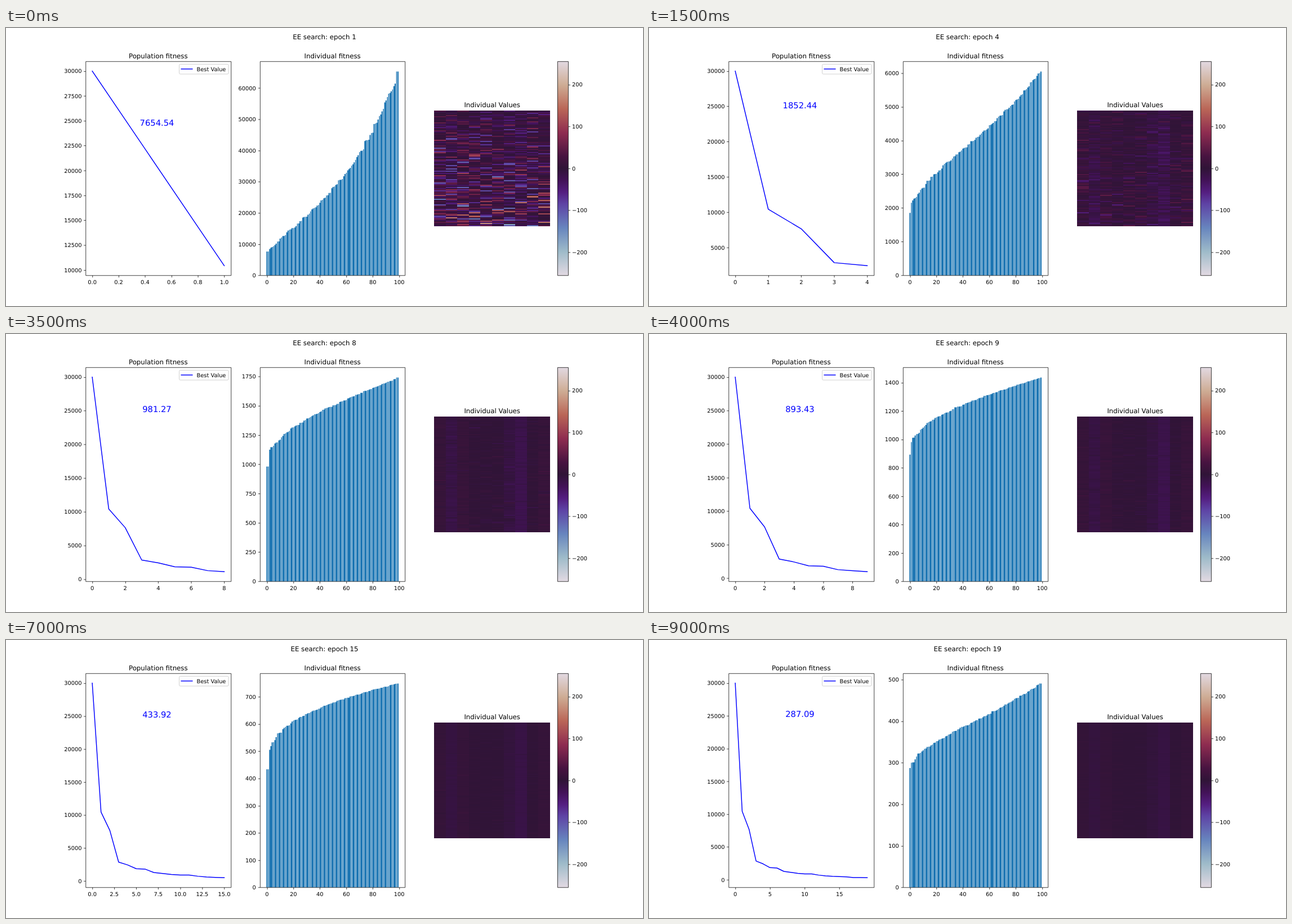
Recreate the animation shown at these times as an HTML page with a canvas. Size 1131 px wide and 495 px high, loop 9500 ms.

```html
<!DOCTYPE html>
<html lang="en">
<head>
<meta charset="utf-8">
<title>EE search</title>
<style>
  html, body { margin: 0; width: 100%; height: 100%; overflow: hidden; background: #fff; }
  svg { position: absolute; left: 0; top: 0; }
  canvas { position: absolute; left: 760px; top: 147px; width: 206px; height: 206px; image-rendering: pixelated; }
  text { font-family: "DejaVu Sans", sans-serif; font-size: 9.82px; white-space: pre; text-rendering: geometricPrecision; }
  .title { font-size: 11.79px; text-anchor: middle; }
  .best { font-size: 14.73px; text-anchor: middle; fill: #00f; }
  .frame { fill: none; stroke: #000; stroke-width: 0.75; }
  .curve { fill: none; stroke: #00f; stroke-width: 1.47; stroke-linejoin: round; stroke-linecap: square; }
</style>
</head>
<body>
<svg width="1131" height="495" viewBox="0 0 1131 495">
  <defs><linearGradient id="map" x1="0" y1="1" x2="0" y2="0"></linearGradient></defs>
  <g id="still"></g>
  <g id="live"></g>
</svg>
<canvas id="heat" width="10" height="100"></canvas>
<script>
const STEP = 500, EPOCHS = 19;
const TOP = 59.4, BOTTOM = 440.5, HEIGHT = BOTTOM - TOP, WIDTH = 257.8;
const LEFT = 141.4, MID = 450.72;
const GRID = 1600 / 1131; // lines and bars snap to this finer grid

// Best value after each generation
const best = [30000, 10440.31, 7654.54, 2853.18, 2431.62, 1852.44, 1793.35, 1277.17, 1127.64, 981.27,
  893.43, 893.43, 709.83, 596.89, 531.46, 493.75, 433.92, 333.28, 333.28, 320.17, 287.09];

// Key epochs: worst fitness and how the sorted bars bend
const keys = [
  { epoch: 1, peak: 65285, bend: 1.05 },
  { epoch: 4, peak: 6048, bend: 0.7 },
  { epoch: 6, peak: 2559, bend: 0.56 },
  { epoch: 9, peak: 1436, bend: 0.45 },
  { epoch: 12, peak: 1054, bend: 0.34 },
  { epoch: 15, peak: 749, bend: 0.37 },
  { epoch: 19, peak: 490.6, bend: 0.65 }
];

// Mean pull of each of the ten genes
const pull = [0.45, -0.7, 0.5, 0.08, 0, 0, -0.5, -1.1, 0.05, 0.5];

const stops = [[0, '#e2d9e2'], [1, '#9ebbc9'], [2, '#6785be'], [3, '#5e43a5'], [3.5, '#541e80'], [4, '#421257'],
  [4.5, '#301437'], [5, '#471340'], [6, '#8e2c50'], [7, '#ba6657'], [8, '#ceac94'], [9, '#e2d9e2']];

const $ = id => document.getElementById(id);
const mix = (a, b, f) => a + (b - a) * f;
const scale = (lo, hi, a, b) => v => mix(a, b, (v - lo) / (hi - lo));

function random(seed) {
  let a = seed * 7919 + 17;
  return () => {
    a = (a + 0x6D2B79F5) | 0;
    let t = Math.imul(a ^ (a >>> 15), 1 | a);
    t = (t + Math.imul(t ^ (t >>> 7), 61 | t)) ^ t;
    return ((t ^ (t >>> 14)) >>> 0) / 4294967296;
  };
}
const gauss = rnd => Math.sqrt(-2 * Math.log(1 - rnd())) * Math.cos(2 * Math.PI * rnd());

const text = (x, y, s, anchor = 'start', cls = '') =>
  `<text x="${x}" y="${y}" text-anchor="${anchor}" class="${cls}">${s}</text>`;
const path = (d, cls) => `<path d="${d}" class="${cls}"/>`;
const snap = v => (Math.round(v * GRID) + 0.5) / GRID;
const box = (x, w) =>
  path(`M${snap(x)} ${snap(TOP)}H${snap(x + w)}V${snap(BOTTOM)}H${snap(x)}Z`, 'frame');

function ticks(lo, hi, bins) {
  const raw = (hi - lo) / bins;
  const mag = 10 ** Math.floor(Math.log10(raw));
  const step = mag * [1, 2, 2.5, 5, 10].find(n => n * mag >= raw * 0.9999);
  const digits = step < 1 || step === 2.5 ? 1 : 0;
  const list = [];
  for (let k = Math.ceil(lo / step); k * step <= hi; k++) list.push([k * step, (k * step).toFixed(digits)]);
  return list;
}

function axes(left, xr, yr, X, Y) {
  let out = box(left, WIDTH);
  for (const [v, label] of ticks(...xr, 8)) {
    out += path(`M${snap(X(v))} ${snap(BOTTOM)}v3.5`, 'frame') + text(X(v), 455.5, label, 'middle');
  }
  for (const [v, label] of ticks(...yr, 9)) {
    out += path(`M${snap(left)} ${snap(Y(v))}h-3.5`, 'frame') + text(left - 6.9, Y(v) + 3.7, label, 'end');
  }
  return out;
}

// Sorted fitness of the hundred individuals
function fitness(epoch) {
  const b = keys.find(k => k.epoch >= epoch);
  const a = keys.filter(k => k.epoch <= epoch).pop();
  const f = a === b ? 0 : (epoch - a.epoch) / (b.epoch - a.epoch);
  const peak = a.peak * (b.peak / a.peak) ** f;
  const bend = mix(a.bend, b.bend, f);
  const lean = 1.5 * Math.max(0, bend - 0.4);
  const rnd = random(epoch);
  return Array.from({ length: 100 }, (_, i) => {
    const jitter = i % 99 ? (rnd() - 0.5) * 3 : 0;
    const u = Math.min(1, Math.max(0, (i + jitter) / 99));
    return mix(best[epoch + 1], peak, u ** (bend + lean * u));
  }).sort((p, q) => p - q);
}

function history(epoch) {
  const last = best[epoch], pad = (best[0] - last) * 0.05;
  const xr = [-0.05 * epoch, 1.05 * epoch], yr = [last - pad, best[0] + pad];
  const X = scale(...xr, LEFT, LEFT + WIDTH), Y = scale(...yr, BOTTOM, TOP);
  const points = best.slice(0, epoch + 1).map((v, i) => `${X(i).toFixed(2)} ${Y(v).toFixed(2)}`);
  return axes(LEFT, xr, yr, X, Y) + path('M' + points.join('L'), 'curve') +
    text(268, Y(24000) - 9.4, best[epoch + 1].toFixed(2), 'middle', 'best');
}

function bars(fit) {
  const xr = [-5.39, 104.39], yr = [0, fit[99] * 1.05];
  const X = scale(...xr, MID, MID + WIDTH), Y = scale(...yr, BOTTOM, TOP);
  const edge = v => (Math.round(X(v) * GRID) / GRID).toFixed(3);
  const d = fit.map((v, i) => `M${edge(i - 0.4)} ${BOTTOM}V${Y(v).toFixed(2)}H${edge(i + 0.4)}V${BOTTOM}Z`).join('');
  return `<path d="${d}" fill="#1f77b4"/>` + axes(MID, xr, yr, X, Y);
}

const rgb = hex => [1, 3, 5].map(i => parseInt(hex.slice(i, i + 2), 16));
function colour(v) {
  const p = Math.min(8.999, Math.max(0, (v + 255) / 510 * 9));
  const i = stops.findIndex(s => s[0] > p);
  const [a, from] = stops[i - 1], [b, to] = stops[i];
  const end = rgb(to);
  return rgb(from).map((c, n) => Math.round(mix(c, end[n], (p - a) / (b - a))));
}

// Each row is a gene vector whose length follows its fitness
function heat(epoch, fit) {
  const rnd = random(epoch + 100), ctx = $('heat').getContext('2d');
  const image = ctx.createImageData(10, 100);
  const noise = 1.4 * Math.exp(-(epoch - 1) / 2.6) + 0.06;
  const mean = 1 - Math.exp(-epoch / 3);
  fit.forEach((f, row) => {
    const genes = pull.map(m => {
      const g = gauss(rnd);
      return m * mean + noise * g * (0.4 + 0.6 * Math.abs(g));
    });
    const size = 0.78 * Math.sqrt(f) / Math.hypot(...genes);
    genes.forEach((g, col) => image.data.set([...colour(g * size), 255], (row * 10 + col) * 4));
  });
  ctx.putImageData(image, 0, 0);
}

function still() {
  $('map').innerHTML = stops.map(([p, c]) => `<stop offset="${p / 9}" stop-color="${c}"/>`).join('');
  const Y = scale(-255.5, 255.5, BOTTOM, TOP);
  let out = text(LEFT + WIDTH / 2, 53.6, 'Population fitness', 'middle', 'title') +
    text(MID + WIDTH / 2, 53.6, 'Individual fitness', 'middle', 'title') +
    text(863.2, 141, 'Individual Values', 'middle', 'title') +
    `<rect x="979.2" y="${TOP}" width="19" height="${HEIGHT}" fill="url(#map)"/>` + box(979.2, 19);
  for (let v = -200; v <= 200; v += 100) {
    out += path(`M998.5 ${snap(Y(v))}h3.5`, 'frame') + text(1005.1, Y(v) + 3.7, String(v).replace('-', '\u2212'));
  }
  $('still').innerHTML = out;
}

function draw(epoch) {
  const fit = fitness(epoch);
  $('live').innerHTML = text(565.5, 19.5, 'EE search: epoch ' + epoch, 'middle', 'title') +
    history(epoch) + bars(fit) +
    '<rect x="307.5" y="64.5" width="87.5" height="17.5" rx="2" fill="#fff" fill-opacity=".8" stroke="#ccc" stroke-opacity=".9"/>' +
    path('M311.2 73H330.8', 'curve') + text(338.6, 76.6, 'Best Value');
  heat(epoch, fit);
}

let shown = 0;
function tick() {
  const epoch = Math.floor(performance.now() / STEP) % EPOCHS + 1;
  if (epoch !== shown) draw(shown = epoch);
  requestAnimationFrame(tick);
}
still();
tick();
</script>
</body>
</html>
```
